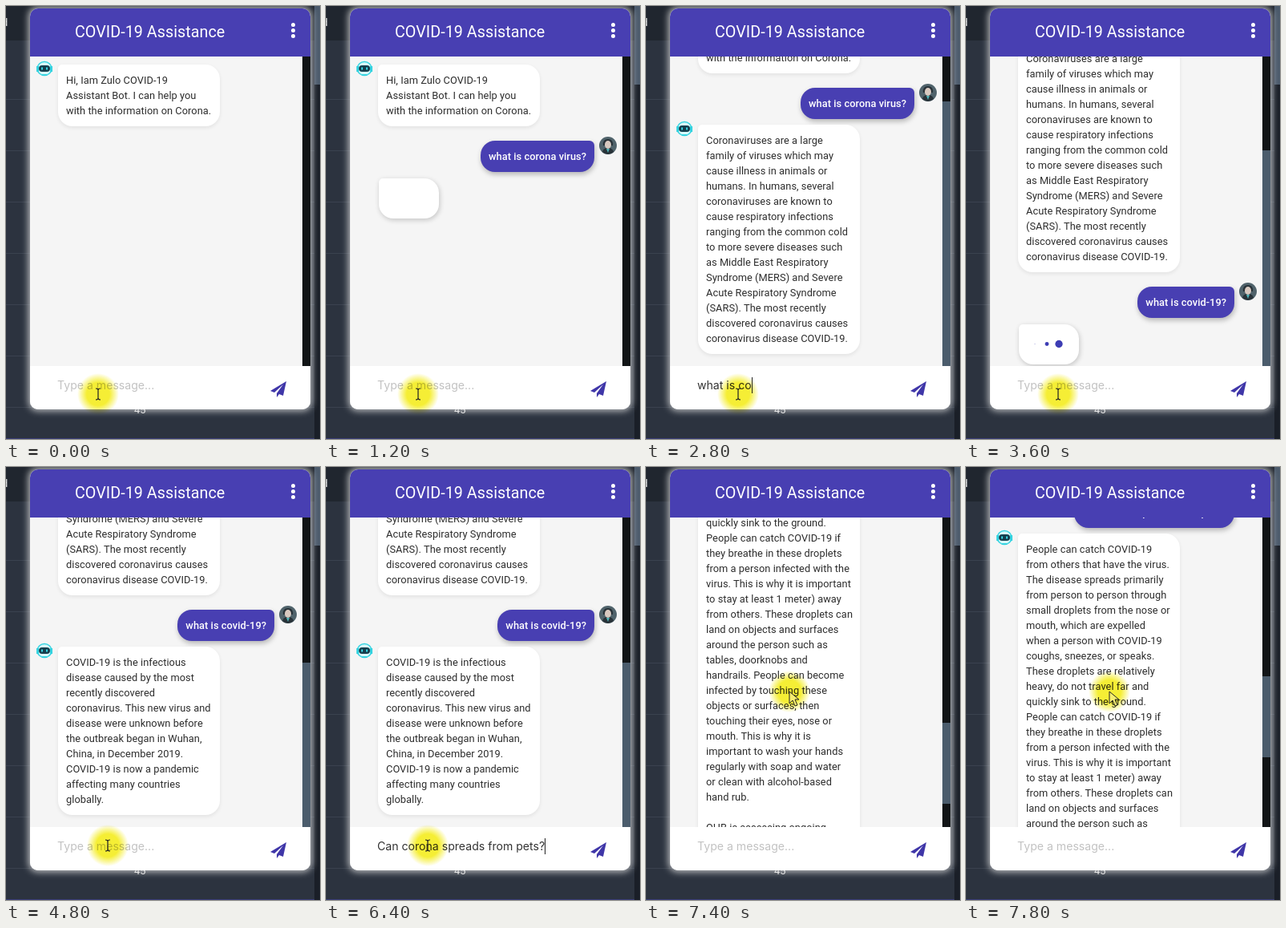
An HTML page that plays this animation: 392x540 px, repeating every 8000 ms.

```html
<!DOCTYPE html>
<html lang="en">
<head>
<meta charset="utf-8">
<title>Chat assistant</title>
<style>
  html, body { margin: 0; width: 100%; height: 100%; overflow: hidden; }
  body { position: relative; background: #2c333f; font: 12.8px/19px Roboto, sans-serif; letter-spacing: .05px; }
  body *, body *::before { position: absolute; box-sizing: border-box; }
  svg { overflow: visible; }
  svg * { position: static; }

  #page { inset: 0; overflow: hidden; color: #eee;
    background: linear-gradient(#3a3d78, #3a3d78) 0 539px / 100% 1px no-repeat,
      repeating-linear-gradient(#0000 0 63px, #3a424f 63px 64px) 0 53px no-repeat,
      linear-gradient(#20262f 43px, #2c333f 43px); }
  #pageBar { left: 385px; top: 0; width: 7px; height: 100%; background: linear-gradient(#4b5a6b 98px, #1a1f28 98px); }

  #panel { left: 30px; top: 3px; width: 350px; height: 500px; border-radius: 10px; background: #f5f5f5;
    box-shadow: 0 0 9px 2px #e4e4e4cc; }
  #header { inset: 0 0 auto; height: 60px; border-radius: 10px 10px 0 0; background: #483fb2; color: #fff; }
  #title { left: 56px; top: 15px; font-size: 19.7px; line-height: 30px; white-space: pre; }
  #menu { left: 326px; top: 18px; width: 5px; height: 5px; border-radius: 50%; background: #fff;
    box-shadow: 0 7px #fff, 0 14px #fff; }

  #view { left: 0; top: 60px; width: 350px; height: 386px; overflow: hidden; }
  #track { right: 0; top: 0; width: 10px; height: 100%; background: #111416; }
  #thumb { width: 10px; background: #4b5c6c; }
  #chat { left: 0; top: 0; width: 340px; }
  .row { left: 0; width: 340px; }
  .bubble { top: 0; padding: 10px; white-space: pre; }
  .bot .bubble { left: 35px; width: 202px; border-radius: 5px 18px 18px 18px; background: #fff; color: #2d2d2d;
    box-shadow: 0 2px 5px #00000014; }
  .user .bubble { right: 35px; border-radius: 18px 6px 18px 18px; background: #483fb2; color: #fff;
    font-weight: 500; box-shadow: 1px 3px 6px #0004; }
  .bot svg { left: 8px; top: -5px; }
  .user svg { left: 311px; top: -5px; }
  #dots { left: 36px; width: 75px; height: 50px; border-radius: 5px 18px 18px 18px; background: #fff;
    box-shadow: 1px 2px 6px #0003; }

  #bar { inset: auto 0 0; height: 54px; border-radius: 0 0 10px 10px; background: #fff; }
  #input { left: 34px; top: 12px; font: 14.1px/24px Inter, sans-serif; letter-spacing: 0; white-space: pre; }
  #input.empty { color: #c2c2c2; }
  #input:not(.empty) { border-right: 1px solid #222; color: #333; line-height: 20px; margin-top: 2px; }
  #send { left: 300px; top: 19px; }

  #glow { left: -26px; top: -26px; width: 52px; height: 52px; border-radius: 50%; mix-blend-mode: multiply;
    background: radial-gradient(closest-side, #f5ee35 55%, #f5ee3500); }
  #cursor { left: 0; top: 0; }
</style>
</head>
<body>
<div id="page">
  <span style="left:-5px;top:11px">d</span>
  <span style="left:160px;top:494px">45</span>
  <div id="pageBar"></div>
</div>
<div id="panel">
  <div id="header"><div id="title">COVID-19 Assistance</div><div id="menu"></div></div>
  <div id="view">
    <div id="chat">
      <svg id="dots" width="75" height="50" fill="#3d3db4">
        <circle cx="20" cy="24.5"/><circle cx="35" cy="24.5"/><circle cx="50" cy="24.5"/>
      </svg>
    </div>
    <div id="track"><div id="thumb"></div></div>
  </div>
  <div id="bar">
    <div id="input"></div>
    <svg id="send" width="20" height="20"><path fill="#3f36a8" d="M20 0 0 12l5 2L16 4 8 15v5l3-4 5 2z"/></svg>
  </div>
</div>
<div id="glow"></div>
<svg id="cursor" width="1" height="1">
  <path id="beam" fill="none" stroke="#222" stroke-width="1.2" d="M-3-7q3 0 3 2q0-2 3-2M0-5V5M-3 7q3 0 3-2q0 2 3 2"/>
  <path id="arrow" fill="#f6ee70" stroke="#222" d="M0 0v15l4-4 3 7 3-1-3-7h5z"/>
</svg>
<script>
const LOOP = 8000, STEP = 200, VIEW = 386, PAD_TOP = 10, PAD_BOTTOM = 15, DOTS_HEIGHT = 38;
const $ = id => document.getElementById(id);
const ramp = (t, from, to) => Math.min(1, Math.max(0, (t - from) / (to - from)));

const greeting = `Hi, Iam Zulo COVID-19
Assistant Bot. I can help you
with the information on Corona.`;

// Typing runs from "type" to "typed"; the message is sent at "sent" and answered at "reply".
const turns = [
  { type: 0, typed: 1000, sent: 1200, reply: 1800, fade: .6, question: 'what is corona virus?',
    answer: `Coronaviruses are a large
family of viruses which may
cause illness in animals or
humans. In humans, several
coronaviruses are known to
cause respiratory infections
ranging from the common cold
to more severe diseases such
as Middle East Respiratory
Syndrome (MERS) and Severe
Acute Respiratory Syndrome
(SARS). The most recently
discovered coronavirus causes
coronavirus disease COVID-19.` },
  { type: 2200, typed: 3200, sent: 3400, reply: 4200, fade: .6, question: 'what is covid-19?',
    answer: `COVID-19 is the infectious
disease caused by the most
recently discovered
coronavirus. This new virus and
disease were unknown before
the outbreak began in Wuhan,
China, in December 2019.
COVID-19 is now a pandemic
affecting many countries
globally.` },
  { type: 4800, typed: 6200, sent: 6600, reply: 6800, fade: .85, question: 'Can corona spreads from pets?',
    answer: `People can catch COVID-19
from others that have the virus.
The disease spreads primarily
from person to person through
small droplets from the nose or
mouth, which are expelled
when a person with COVID-19
coughs, sneezes, or speaks.
These droplets are relatively
heavy, do not travel far and
quickly sink to the ground.
People can catch COVID-19 if
they breathe in these droplets
from a person infected with the
virus. This is why it is important
to stay at least 1 meter) away
from others. These droplets can
land on objects and surfaces
around the person such as
tables, doorknobs and
handrails. People can become
infected by touching these
objects or surfaces, then
touching their eyes, nose or
mouth. This is why it is
important to wash your hands
regularly with soap and water
or clean with alcohol-based
hand rub.

QHB is assessing ongoing
research on the ways that
COVID-19 is spread and will
continue to share updated
findings.` },
];

const avatars = {
  bot: `<svg width="20" height="20"><ellipse cx="10" cy="10" rx="9" ry="8.5" fill="#d8fbfd" stroke="#35d3e0" stroke-width="1.5"/>
    <path fill="#35d3e0" d="M0 7h3v7H0zM17 7h3v7h-3zM7 17h6v2H7z"/><rect x="3" y="6" width="14" height="8" rx="4" fill="#153f4e"/>
    <path fill="#35d3e0" d="M6 8.5h2v3H6zM12 8.5h2v3h-2z"/></svg>`,
  user: `<svg width="22" height="22"><circle cx="11" cy="11" r="11" fill="#50636b"/>
    <path fill="#283238" d="M5 11Q4 3 11 3t6 8zM4 19q1-5 7-5t7 5q-7 6-14 0"/>
    <ellipse cx="11" cy="10" rx="4" ry="5" fill="#d8c9c0"/><path fill="#4fb3b8" d="M9 15h4l-2 5z"/></svg>`,
};

const rows = [];
let nextTop = PAD_TOP;
function addRow(sender, text, at, fade = 1) {
  const el = document.createElement('div');
  el.className = 'row ' + sender;
  el.innerHTML = avatars[sender] + '<div class="bubble"></div>';
  el.lastChild.textContent = text;
  if (sender === 'user') nextTop += 18;
  else if (rows.length) nextTop += 7;
  const top = nextTop;
  nextTop += 20 + 19 * text.split('\n').length;
  el.style.top = top + 'px';
  $('chat').append(el);
  rows.push({ el, at, fade, bottom: nextTop });
  return top;
}
addRow('bot', greeting, -STEP);
for (const turn of turns) {
  addRow('user', turn.question, turn.sent);
  turn.top = addRow('bot', turn.answer, turn.reply, turn.fade);
}

function drawChat(t) {
  let bottom = 0;
  for (const { el, at, fade, bottom: end } of rows) {
    el.style.display = t >= at ? '' : 'none';
    el.style.opacity = t < at + STEP ? fade : 1;
    if (t >= at) bottom = end;
  }
  const waiting = turns.find(turn => t >= turn.sent && t < turn.reply);
  $('dots').style.display = waiting ? '' : 'none';
  if (waiting) {
    bottom = waiting.top + DOTS_HEIGHT;
    $('dots').style.top = waiting.top + 1 + 'px';
    [...$('dots').children].forEach((dot, i) => {
      const phase = ((t - 3600) / 1400 + 2.73 - i * .114) % 1;
      dot.setAttribute('r', phase < .8 ? 5.5 * Math.sin(Math.PI * phase / .8) ** 2 : 0);
    });
  }
  const height = Math.max(VIEW, bottom + PAD_BOTTOM);
  const scroll = height - VIEW - 334 * ramp(t, 7200, 7800);
  $('chat').style.top = -scroll + 'px';
  $('thumb').style.display = height > VIEW ? '' : 'none';
  $('thumb').style.top = scroll * VIEW / height + 'px';
  $('thumb').style.height = VIEW * VIEW / height + 'px';
}

function drawInput(t) {
  const turn = turns.find(turn => t > turn.type && t < turn.sent);
  const typed = turn ? turn.question.slice(0, Math.round(turn.question.length * ramp(t, turn.type, turn.typed))) : '';
  $('input').textContent = typed || 'Type a message...';
  $('input').className = typed ? '' : 'empty';
}

function drawCursor(t) {
  const nudge = ramp(t, 4400, 4800), rise = ramp(t, 6800, 7400);
  const x = 115 + 12 * nudge + 52 * rise, y = 484 - 12 * nudge - 192 * rise;
  $('glow').style.transform = $('cursor').style.transform = `translate(${x}px, ${y}px)`;
  const overInput = y > 452;
  $('beam').style.display = overInput ? '' : 'none';
  $('arrow').style.display = overInput ? 'none' : '';
}

function frame() {
  // The picture advances in fixed steps, like a screen recording.
  const t = Math.floor(performance.now() % LOOP / STEP) * STEP;
  drawChat(t);
  drawInput(t);
  drawCursor(t);
  requestAnimationFrame(frame);
}
frame();
</script>
</body>
</html>
```
